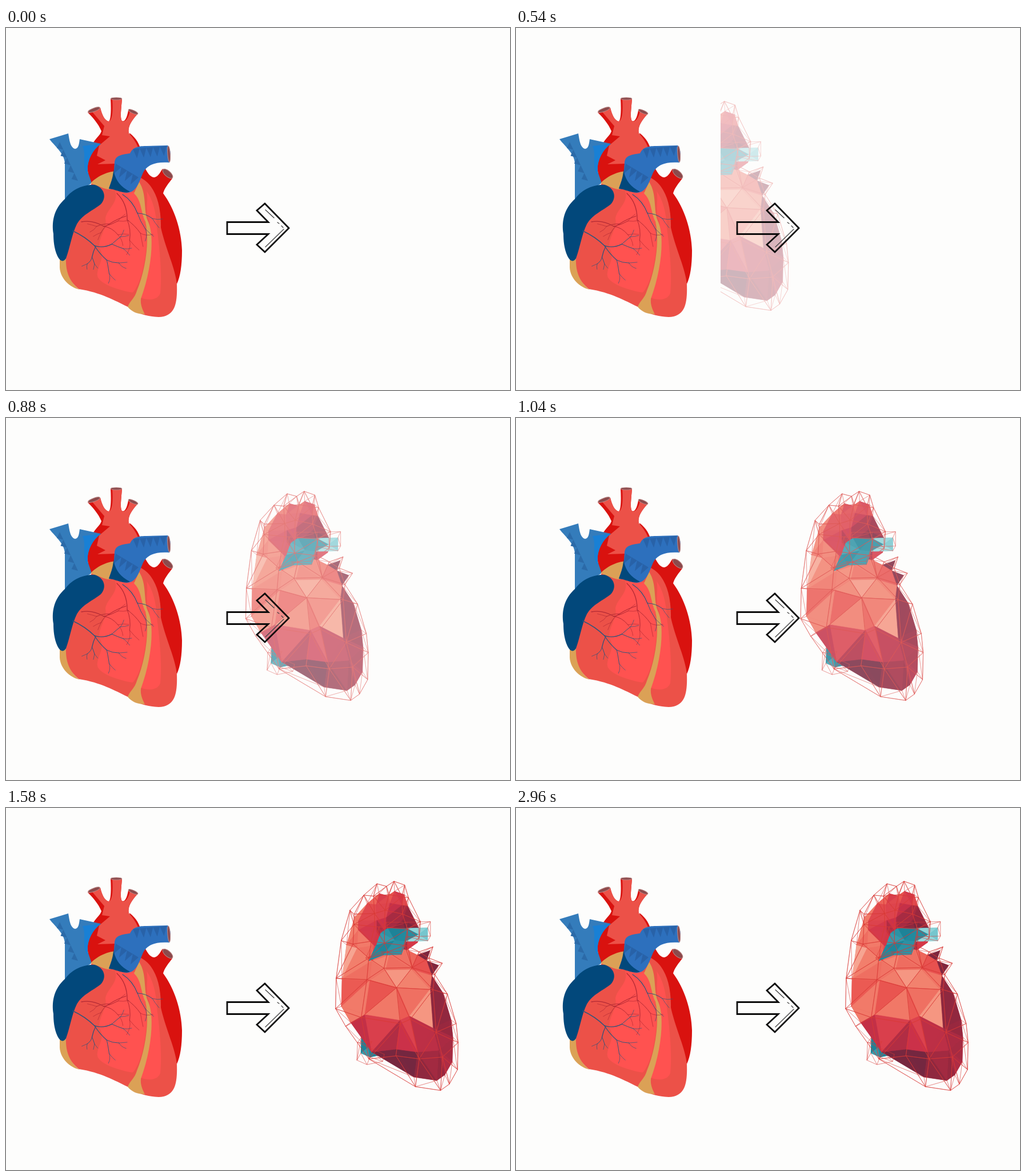
Write an HTML page that moves like this. It is 882 px wide and 635 px high and loops after 3000 ms.

```html
<!DOCTYPE html>
<html lang="en">
<head>
<meta charset="utf-8">
<title>Heart to polygon heart</title>
<style>
html, body { margin: 0; width: 100%; height: 100%; overflow: hidden; background: #fdfdfc; }
svg { display: block; width: 882px; height: 635px; }
.line { fill: none; stroke-linecap: round; stroke-linejoin: round; }
</style>
</head>
<body>
<svg viewBox="0 0 882 635" xmlns="http://www.w3.org/2000/svg">
  <defs><clipPath id="window"><rect x="358" width="524" height="635"/></clipPath></defs>
  <g id="anatomy"></g>
  <g clip-path="url(#window)"><g id="poly"></g></g>
  <g class="line" stroke="#0c0c0c">
    <path stroke-width="2.8" stroke-linejoin="miter" d="M387 340.5H459L439 320L453 308L495 351L453 393L439 380L459 361.5H387Z"/>
    <path stroke-width="1.3" stroke="#444" d="M454 319L469 333M475 341L478 343M482 347L485 350M486 353L454 384"/>
  </g>
</svg>
<script>
const $ = id => document.getElementById(id);
const anatomy = $('anatomy'), poly = $('poly');

function add(parent, tag, attrs) {
  const node = document.createElementNS('http://www.w3.org/2000/svg', tag);
  for (const key in attrs) node.setAttribute(key, attrs[key]);
  return parent.appendChild(node);
}

function seeded(seed) {
  return () => {
    seed = (seed * 16807) % 2147483647;
    return seed / 2147483647;
  };
}

// ---- Anatomical heart ----
const RED = '#d9120f', SALMON = '#ec5148', BRIGHT = '#ff5250';
const FAT = '#dba156', NAVY = '#02487b', BLUE = '#2d70bd';
const shape = (fill, d) => add(anatomy, 'path', { fill, d });
const opening = (x, y, rx, ry, angle) => add(anatomy, 'ellipse', {
  cx: x, cy: y, rx, ry, transform: `rotate(${angle} ${x} ${y})`, fill: '#8b4a4c', stroke: '#b98583'
});

// Saw-toothed shadow hanging from a straight line
function folds(fill, x1, y1, x2, y2, count, depth) {
  const length = Math.hypot(x2 - x1, y2 - y1);
  const nx = (y1 - y2) / length * depth, ny = (x2 - x1) / length * depth;
  let d = `M${x1} ${y1}`;
  for (let i = 1; i < 2 * count; i++) {
    const t = i / (2 * count), out = i % 2;
    d += `L${x1 + (x2 - x1) * t + nx * out} ${y1 + (y2 - y1) * t + ny * out}`;
  }
  shape(fill, `${d}L${x2} ${y2}Z`);
}

// Vessel that bends and forks
function twig(random, stroke, x, y, angle, length, depth) {
  const bend = angle + (random() - .5) * .9;
  const cx = x + Math.cos(bend) * length * .5, cy = y + Math.sin(bend) * length * .5;
  const ex = x + Math.cos(angle) * length, ey = y + Math.sin(angle) * length;
  add(anatomy, 'path', {
    class: 'line', stroke, 'stroke-width': .7 + depth * .3, d: `M${x} ${y}Q${cx} ${cy} ${ex} ${ey}`
  });
  if (!depth) return;
  twig(random, stroke, ex, ey, angle + .2 + random() * .4, length * .72, depth - 1);
  twig(random, stroke, ex, ey, angle - .3 - random() * .4, length * .66, depth - 1);
}

function drawAnatomy() {
  // Descending aorta and right edge
  shape(RED, 'M216 184C229 194 234 205 236 215L241 240C246 252 251 261 259 262C267 261 270 252 274 247L291 264C285 272 277 281 275 290C295 317 307 355 308 390C308 417 305 436 299 449L262 380L232 262Z');
  opening(283, 255.5, 11, 5, 42);

  // Aortic arch
  shape(RED, 'M143 148L165 140C168 152 172 162 180 164C184 160 184 140 183 124L203 124C202 140 199 158 203 163C209 166 213 152 214 144L231 150C222 160 212 172 215 185C225 195 232 205 235 214L225 262L150 272C138 255 142 222 152 203C156 194 165 188 167 181C162 168 150 155 143 148Z');
  shape(SALMON, 'M150 146L165 140C168 152 172 162 180 164C185 162 188 150 186 124L203 124C202 140 199 158 203 163C209 166 215 158 217 145L231 150C222 160 212 172 215 185C223 193 229 203 232 212L190 238L160 239L174 232L159 224L163 206L182 190L168 188L172 172Z');
  opening(154, 143.5, 11, 3, -20);
  opening(193, 124, 10, 2, 0);
  opening(222.5, 147, 9, 2.6, 24);

  // Vena cava
  shape('#347cbb', 'M76 195L109 185C111 195 112 210 121 212C128 211 128 200 129 195L166 203C150 215 141 235 143 252L150 272L103 301L103 237C102 220 87 209 76 195Z');
  folds('#2b6aa8', 94, 200, 126, 268, 5, 9);
  shape('#1980d5', 'M134 207L166 203C150 215 141 235 143 252L144 260C130 240 142 225 134 207Z');

  // Ventricles
  shape(FAT, 'M94 406L107 400C104 428 113 448 129 459C112 455 95 440 94 420Z');
  shape(SALMON, 'M150 272C170 252 215 250 238 264C258 275 272 305 271 350C280 390 296 420 299 449C300 482 297 506 267 507C243 506 230 500 213 489C190 478 166 464 128 458C110 445 104 425 105 402L117 345Z');
  shape(BRIGHT, 'M191 286L229 288C240 315 247 350 246 380C243 421 233 452 222 464C195 460 163 448 160 435C158 420 174 404 165 389C158 370 178 354 174 334C176 318 198 306 191 286Z');
  shape(BRIGHT, 'M246 286C258 303 263 326 264 350C270 395 273 435 270 465C266 477 250 479 236 473C253 425 256 370 251 340C242 320 250 303 246 286Z');

  // Coronary fat
  shape(FAT, 'M148 272C160 260 176 252 194 251L183 283C172 284 165 277 157 276Z');
  shape(FAT, 'M224 290L233 270C247 292 240 318 248 338C260 361 256 420 236 475C235 486 239 494 243 502C230 502 220 498 213 489C217 478 225 475 229 461C243 427 252 376 244 340C235 320 238 304 224 290Z');

  // Right atrium and pulmonary artery
  shape(NAVY, 'M104 299C117 281 139 274 155 275C172 280 177 297 166 309C151 321 134 327 124 344C115 362 112 385 105 404C101 411 95 410 90 400C84 387 83 372 83 361C80 343 82 318 104 299Z');
  shape(BLUE, 'M190 236C191 223 203 222 217 220C222 208 235 207 246 207L283 206C290 214 288 229 286 236C260 234 245 241 239 256C232 273 227 289 211 289C198 287 188 280 180 281C184 270 189 260 189 249Z');
  folds('#2862a8', 222, 212, 281, 207, 5, 17);
  folds('#2862a8', 192, 238, 232, 262, 4, 18);
  shape(NAVY, 'M188 248C190 263 198 278 217 287C205 292 194 283 180 282C184 270 188 260 188 248Z');
  opening(285, 221, 2.2, 14, -4);

  // Surface vessels
  const random = seeded(77), dark = '#b32a35', navy = '#33547a';
  twig(random, dark, 194, 290, 1.2, 50, 2);
  twig(random, dark, 210, 330, 2.7, 32, 2);
  twig(random, dark, 132, 340, .2, 40, 2);
  twig(random, navy, 204, 292, .9, 42, 2);
  twig(random, navy, 117, 356, .6, 46, 3);
  twig(random, navy, 157, 383, 1.9, 20, 2);
}

// ---- Polygon heart ----
const parse = text => text.split(' ').map(pair => pair.split(',').map(Number));
const outlinePath = points => `M${points.join('L')}Z`;

function inside([x, y], outline) {
  return outline.reduce((hit, [ax, ay], i) => {
    const [bx, by] = outline.at(i - 1);
    return (ay > y) !== (by > y) && x < ax + (bx - ax) * (y - ay) / (by - ay) ? !hit : hit;
  }, false);
}

function circumcircle([ax, ay], [bx, by], [cx, cy]) {
  bx -= ax; by -= ay; cx -= ax; cy -= ay;
  const d = 2 * (bx * cy - by * cx), b = bx * bx + by * by, c = cx * cx + cy * cy;
  const ux = (cy * b - by * c) / d, uy = (bx * c - cx * b) / d;
  return { x: ax + ux, y: ay + uy, r: Math.hypot(ux, uy) };
}

// Delaunay: keep each triple whose circumcircle holds no other point.
function triangulate(outline, inner) {
  const points = [...outline, ...inner], faces = [];
  points.forEach((a, i) => points.slice(i + 1).forEach((b, j) => points.slice(i + j + 2).forEach(c => {
    const { x, y, r } = circumcircle(a, b, c);
    if (!Number.isFinite(r) || points.some(p => Math.hypot(p[0] - x, p[1] - y) < r - 1e-6)) return;
    const middle = [(a[0] + b[0] + c[0]) / 3, (a[1] + b[1] + c[1]) / 3];
    if (inside(middle, outline)) faces.push({ corners: [a, b, c], middle });
  })));
  return faces;
}

function ramp(colours, tone) {
  const t = Math.min(.999, Math.max(0, tone)) * (colours.length - 1), i = Math.floor(t);
  const channel = (hex, k) => parseInt(hex.substr(k * 2, 2), 16);
  const mix = k => Math.round(channel(colours[i], k) + (t - i) * (channel(colours[i + 1], k) - channel(colours[i], k)));
  return `rgb(${[0, 1, 2].map(mix)})`;
}

function solid(outline, inner, colours, toneAt, seed) {
  const random = seeded(seed), faces = triangulate(outline, inner);
  add(poly, 'path', { d: outlinePath(outline), fill: ramp(colours, .5) });
  for (const { corners, middle } of faces) {
    const fill = ramp(colours, toneAt(...middle) + (random() - .5) * .2);
    add(poly, 'path', { d: outlinePath(corners), fill, stroke: fill, 'stroke-width': .6 });
  }
  return faces;
}

const FLESH = ['572640', '96283f', 'd0324a', 'ea5650', 'f48a74', 'fac8ba'];
const TEAL = ['0e6078', '1f879b', '5bb8c4', 'a5dde0'];
const silhouette = parse('653,150 668,154 680,146 697,152 703,172 722,210 720,236 702,249 720,258 742,250 736,268 757,276 745,294 765,325 779,372 782,402 781,445 768,468 754,478 714,472 640,428 603,376 587,348 588,300 596,240 610,192 632,168');
const ridges = parse('637,302 664,284 709,283 684,315 742,318 706,365 747,386 628,362 690,372 683,423 720,428 757,425 640,268 670,258');
const artery = parse('668,211 701,211 738,210 738,233 700,234 692,257 660,258 635,268 648,240 656,219');
const lobe = parse('622,402 621,430 637,437 662,432 640,410');

const isVentricle = (x, y) => y > 256 + Math.max(0, 650 - x) * .7;
const glow = (x, y, cx, cy) => .26 * Math.exp(-((x - cx) ** 2 + (y - cy) ** 2) / 500);

function fleshTone(x, y) {
  if (!isVentricle(x, y)) return Math.min(.82, .08 + Math.hypot(x - 690, y - 208) / 125);
  const belly = y - 366 - (x - 628) * .12;
  const flank = x - 744 - (y - 318) * .25;
  if (flank > 0) return .2;
  if (belly > 0) return .44 - belly * .0038;
  return .66 + glow(x, y, 686, 294) + glow(x, y, 732, 356);
}

function archPoints() {
  const random = seeded(5), points = [];
  for (let y = 172; y < 260; y += 24)
    for (let x = 618; x < 700; x += 26) {
      const p = [x + random() * 12 - 6, y + random() * 12 - 6];
      if (inside(p, silhouette) && !isVentricle(...p)) points.push(p);
    }
  return points;
}

function drawPoly() {
  const tealTone = x => x > 712 ? .85 : .4;
  solid(lobe, [[634, 420]], TEAL, tealTone, 9);
  const faces = solid(silhouette, [...ridges, ...archPoints()], FLESH, fleshTone, 21);
  solid(artery, [[680, 232], [722, 222]], TEAL, tealTone, 42);

  // Wire cage: the same mesh, enlarged and tied to the silhouette
  const grow = ([x, y]) => [690 + (x - 690) * 1.1, 312 + (y - 312) * 1.105];
  let wire = faces.map(face => outlinePath(face.corners.map(grow))).join('');
  for (const outline of [silhouette, artery, lobe]) {
    wire += outlinePath(outline.map(grow));
    outline.forEach((p, i) => wire += `M${outline.at(i - 1)}L${grow(p)}L${p}`);
  }
  add(poly, 'path', { class: 'line', d: wire, stroke: '#d93a36', 'stroke-width': .6 });
}

// ---- Motion: linear slide and fade at 24 pictures per second ----
const LOOP = 3000, FPS = 24, START = 5, END = 29, STEP = 19.65;

function draw(ms) {
  const tick = Math.floor((ms + 5) * FPS / 1000);
  const left = Math.max(0, END - tick);
  const fade = Math.min(1, Math.max(0, (tick - START) / (END - START)));
  poly.setAttribute('transform', `translate(${-STEP * left} 0)`);
  poly.setAttribute('opacity', fade);
}

drawAnatomy();
drawPoly();
const begin = performance.now();
function loop() {
  draw((performance.now() - begin) % LOOP);
  requestAnimationFrame(loop);
}
loop();
</script>
</body>
</html>
```
